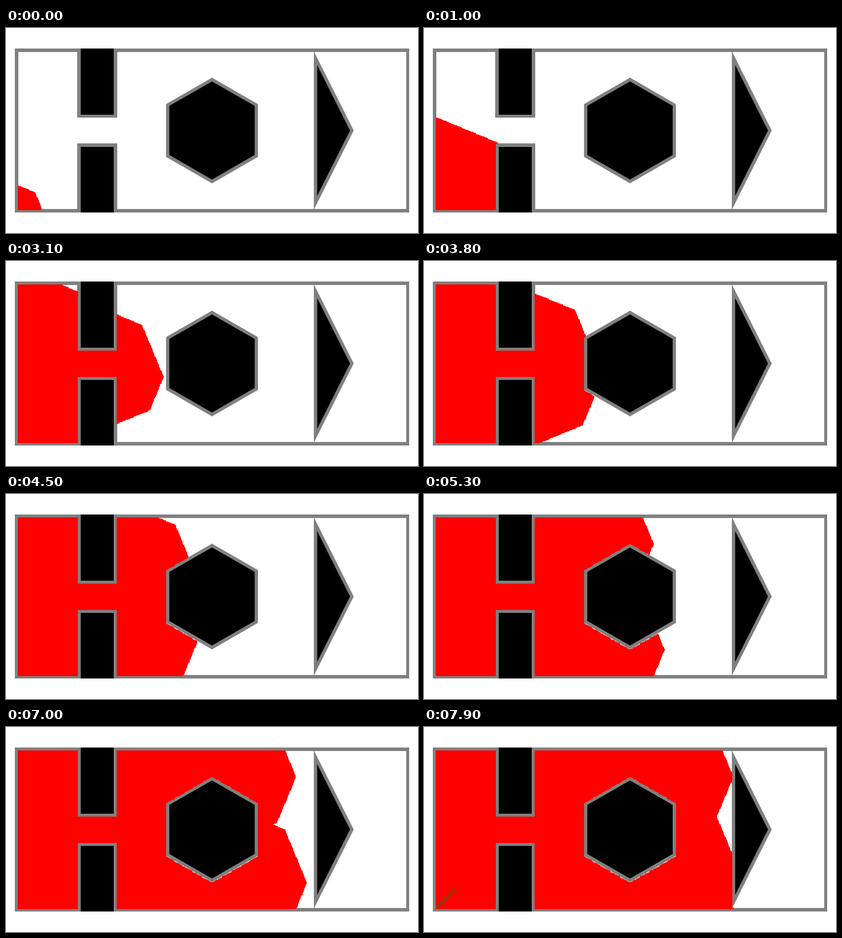
An HTML page with a canvas that plays this animation: 700x350 px, repeating every 8000 ms.

```html
<!DOCTYPE html>
<html lang="en">
<head>
<meta charset="utf-8">
<title>Shortest path search</title>
<style>
  html, body { margin: 0; width: 700px; height: 350px; overflow: hidden; background: #fff; }
  canvas { display: block; }
</style>
</head>
<body>
<canvas id="stage" width="700" height="350"></canvas>
<script>
const ctx = document.getElementById('stage').getContext('2d');
const W = 600, H = 250, SCALE = 67 / 60;
const START = 6, REACH = 539.5, RATE = 1025;
const FRAME = 100, FRAMES = 80, PATH = 28;
const HEX = 75, HEX_OUT = HEX + 10 / Math.sqrt(3), TIP = 510 + 2.5 * Math.sqrt(5);

const sx = x => 15 + x * SCALE;
const sy = y => 314.58 - y * SCALE;

function isFree(x, y) {
  if (x < 5 || x > 595 || y < 4 || y > 246) return false;
  if (x > 95 && x < 155 && (y < 105 || y > 145)) return false;
  const dx = Math.abs(x - 300), dy = Math.abs(y - 125);
  if (dx < HEX_OUT * Math.sqrt(3) / 2 && dy + dx / Math.sqrt(3) < HEX_OUT) return false;
  return !(x > 455 && dy < 2 * (TIP - x));
}

// Dijkstra on the 8-connected grid; buckets of width 1 keep it exact.
function search() {
  const dist = new Float64Array(W * H).fill(Infinity);
  const done = new Uint8Array(W * H);
  const buckets = [[START * W + START]], order = [];
  dist[buckets[0][0]] = 0;
  for (let b = 0; b < buckets.length; b++) {
    for (const i of buckets[b] || []) {
      if (done[i]) continue;
      done[i] = 1;
      order.push(i);
      const x = i % W, y = Math.floor(i / W);
      for (let dy = -1; dy <= 1; dy++) {
        for (let dx = -1; dx <= 1; dx++) {
          const j = i + dy * W + dx, d = dist[i] + Math.hypot(dx, dy);
          if (d > REACH || !isFree(x + dx, y + dy) || d >= dist[j]) continue;
          dist[j] = d;
          (buckets[Math.floor(d)] ||= []).push(j);
        }
      }
    }
  }
  return order.sort((a, b) => dist[a] - dist[b]);
}

function polygon(color, points) {
  ctx.fillStyle = color;
  ctx.beginPath();
  for (const [x, y] of points) ctx.lineTo(sx(x), sy(y));
  ctx.fill();
}

function hexagon(color, r) {
  polygon(color, [0, 1, 2, 3, 4, 5].map(k =>
    [300 + r * Math.sin(k * Math.PI / 3), 125 + r * Math.cos(k * Math.PI / 3)]));
}

function triangle(color, left, tip) {
  const h = 2 * (tip - left);
  polygon(color, [[left, 125 - h], [tip, 125], [left, 125 + h]]);
}

function box(color, x0, y0, x1, y1) {
  ctx.fillStyle = color;
  ctx.fillRect(x0, y0, x1 - x0, y1 - y0);
}

function drawMap() {
  box('#fff', 0, 0, 700, 350);
  box('#808080', 15, 35, 685, 315);
  box('#fff', 21, 41, 680, 309);
  box('#808080', 121, 35, 189, 153);
  box('#808080', 121, 197, 189, 315);
  box('#000', 127, 35, 183, 148);
  box('#000', 127, 203, 183, 315);
  hexagon('#808080', HEX_OUT);
  hexagon('#000', HEX);
  triangle('#808080', 455, TIP);
  triangle('#000', 460, 510);
}

const cells = search();
const searchEnd = cells.length / RATE;
let drawn = Infinity, lastFrame = -1;

function drawFrame(frame) {
  if (frame < lastFrame || drawn === Infinity) {
    drawMap();
    drawn = 0;
  }
  lastFrame = frame;
  const count = Math.min(cells.length, RATE * (frame + 1));
  ctx.fillStyle = '#f00';
  for (; drawn < count; drawn++) {
    const x = cells[drawn] % W, y = Math.floor(cells[drawn] / W);
    const left = Math.floor(sx(x)), top = Math.round(sy(y));
    ctx.fillRect(left, top, Math.floor(sx(x + 1)) - left, Math.round(sy(y - 1)) - top);
  }
  const steps = PATH * (frame + 1 - searchEnd) / (FRAMES - searchEnd);
  if (steps > 0) {
    ctx.strokeStyle = '#008000';
    ctx.lineWidth = 2;
    ctx.beginPath();
    ctx.moveTo(sx(START), sy(START));
    ctx.lineTo(sx(START + steps), sy(START + steps));
    ctx.stroke();
  }
}

const begin = performance.now();
function tick() {
  const frame = Math.floor((performance.now() - begin) / FRAME) % FRAMES;
  if (frame !== lastFrame) drawFrame(frame);
  requestAnimationFrame(tick);
}
tick();
</script>
</body>
</html>
```
